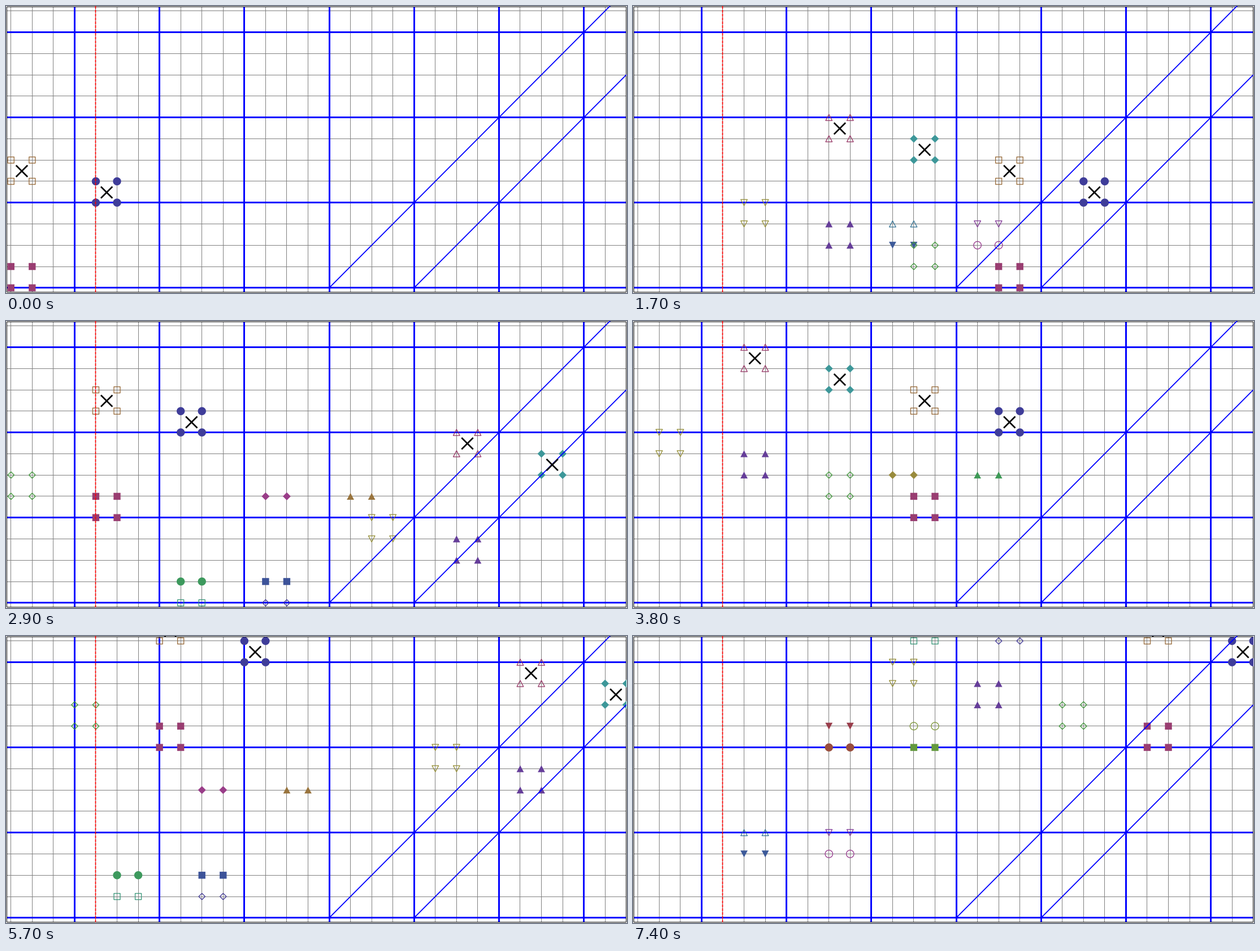
These frames come from a looping animation (1099x509 px, 7500 ms). A matplotlib script:

```python
import colorsys
from math import floor

import matplotlib.pyplot as plt
import numpy as np
from matplotlib.animation import FuncAnimation
from matplotlib.collections import LineCollection, PolyCollection
from matplotlib.patches import Rectangle

W, H, DPI = 1099, 509, 72
FRAMES, INTERVAL = 75, 100
PERIOD, BLOCK = 25, 4          # frames per pass, rows gained per pass
BIRTH_COLUMN = 14              # where falling pairs appear
GOLDEN = (1 + 5 ** 0.5) / 2


def px(col):
    return 8.78 + 37.55 * col


def py(row):
    return 499.8 - 37.77 * row


def pixel_center(v):
    return floor(v) + 0.5


def ngon(n, radius=1.0, phase=0.0):
    a = 2 * np.pi * (np.arange(n) + phase) / n
    return radius * np.column_stack([np.cos(a), np.sin(a)])


TRIANGLE = np.array([(-1, 0.95), (1, 0.95), (0, -0.95)])
SHAPES = [ngon(48), ngon(4, 2 ** 0.5, 0.5), ngon(4), TRIANGLE, -TRIANGLE]
SOLID_SIZES = (7.2, 6.2, 7.0, 6.4, 6.4)
OPEN_SIZES = (6.7, 5.5, 5.7, 5.8, 5.8)

fig = plt.figure(figsize=((W + 0.01) / DPI, (H + 0.01) / DPI), dpi=DPI,
                 facecolor="white")
ax = fig.add_axes([0, 0, 1, 1])
ax.set(xlim=(0, W), ylim=(H, 0))
ax.axis("off")
window = Rectangle((1, 0), 1097, 508, transform=ax.transData)


def line(xs, ys, color, width, z, **kw):
    ax.plot(xs, ys, color=color, lw=width, zorder=z, snap=False,
            solid_capstyle="butt", **kw)


def grid_style(major):
    return ("blue", 3, 2) if major else ("0.5", 1, 1)


def draw_grid():
    for col in range(29):
        line([pixel_center(px(col))] * 2, [1, 507], *grid_style(col % 4 == 3))
    for row in range(14):
        line([1, 1098], [pixel_center(py(row))] * 2, *grid_style(row % 4 == 0))
    ax.add_patch(Rectangle((1.5, 1.5), 1096, 506, fill=False, ec="black",
                           lw=1, zorder=3, snap=False))
    for start, length in ((15, 13.25), (19, 10)):
        line([px(start), px(start + length)], [py(0), py(length)],
             "blue", 1.8, 50)
    line([pixel_center(px(4))] * 2, [0, 507.5], "red", 1.7, 50,
         linestyle=(0, (3, 1)), dash_capstyle="butt")


class Series:
    """All markers of one kind; shape and hue follow from its number."""

    def __init__(self, k):
        style, shape = divmod((k - 1) % 10, 5)
        size = (OPEN_SIZES if style else SOLID_SIZES)[shape]
        self.outline = SHAPES[shape] * size
        hue = (0.67 + 2 * (k - 1) / GOLDEN) % 1
        color = colorsys.hsv_to_rgb(hue, 0.6, 0.6)
        self.artist = PolyCollection(
            [], facecolors="none" if style else [color],
            edgecolors=[color] if style else "none",
            linewidths=1.35, zorder=10 + k, snap=False)
        ax.add_collection(self.artist, autolim=False)
        self.artist.set_clip_path(window)

    def place(self, points):
        self.artist.set_verts([self.outline + (px(c), py(r))
                               for c, r in points])


def runner_position(i, upper, t):
    """Lower-left cell of a 2x2 block that moves right, then wraps upward."""
    entry = BLOCK * upper
    col = entry - 4 * i + t
    laps = max(0, (col - entry) // PERIOD)
    return col - PERIOD * laps, entry + i + BLOCK * laps


def faller_points(j, t):
    """Pairs that drop diagonally, one new pair per pass."""
    birth, row = 11 + 4 * ((j + 1) // 2), 4 + j // 2
    points = []
    for lap in range(3):
        age = t - PERIOD * lap - birth
        if age >= 0:
            col, r = BIRTH_COLUMN - age, row + BLOCK * lap - age
            points += [(col, r), (col + 1, r)]
    return points


def cross_segments(col, row):
    x, y, arm = px(col + 0.51), py(row + 0.48), 10.2
    return [[(x - arm, y - s * arm), (x + arm, y + s * arm)] for s in (-1, 1)]


draw_grid()
series = {k: Series(k) for k in range(1, 25)}
crosses = LineCollection([], colors="black", linewidths=2.7, zorder=60)
ax.add_collection(crosses, autolim=False)
crosses.set_clip_path(window)


def update(t):
    segments = []
    for i in range(4):
        for upper in (True, False):
            c, r = runner_position(i, upper, t)
            series[6 * i + (1 if upper else 2)].place(
                [(c + a, r + b) for a in (0, 1) for b in (0, 1)])
            if upper:
                segments += cross_segments(c, r)
    crosses.set_segments(segments)
    for j in range(8):
        k = 6 * (j // 2) + 3 + 2 * (j % 2)
        points = faller_points(j, t)
        series[k].place(points)
        series[k + 1].place([(c + 4, r) for c, r in points])
    return [*(s.artist for s in series.values()), crosses]


anim = FuncAnimation(fig, update, frames=FRAMES, interval=INTERVAL,
                     repeat=True, repeat_delay=0, blit=False)
plt.show()
```
